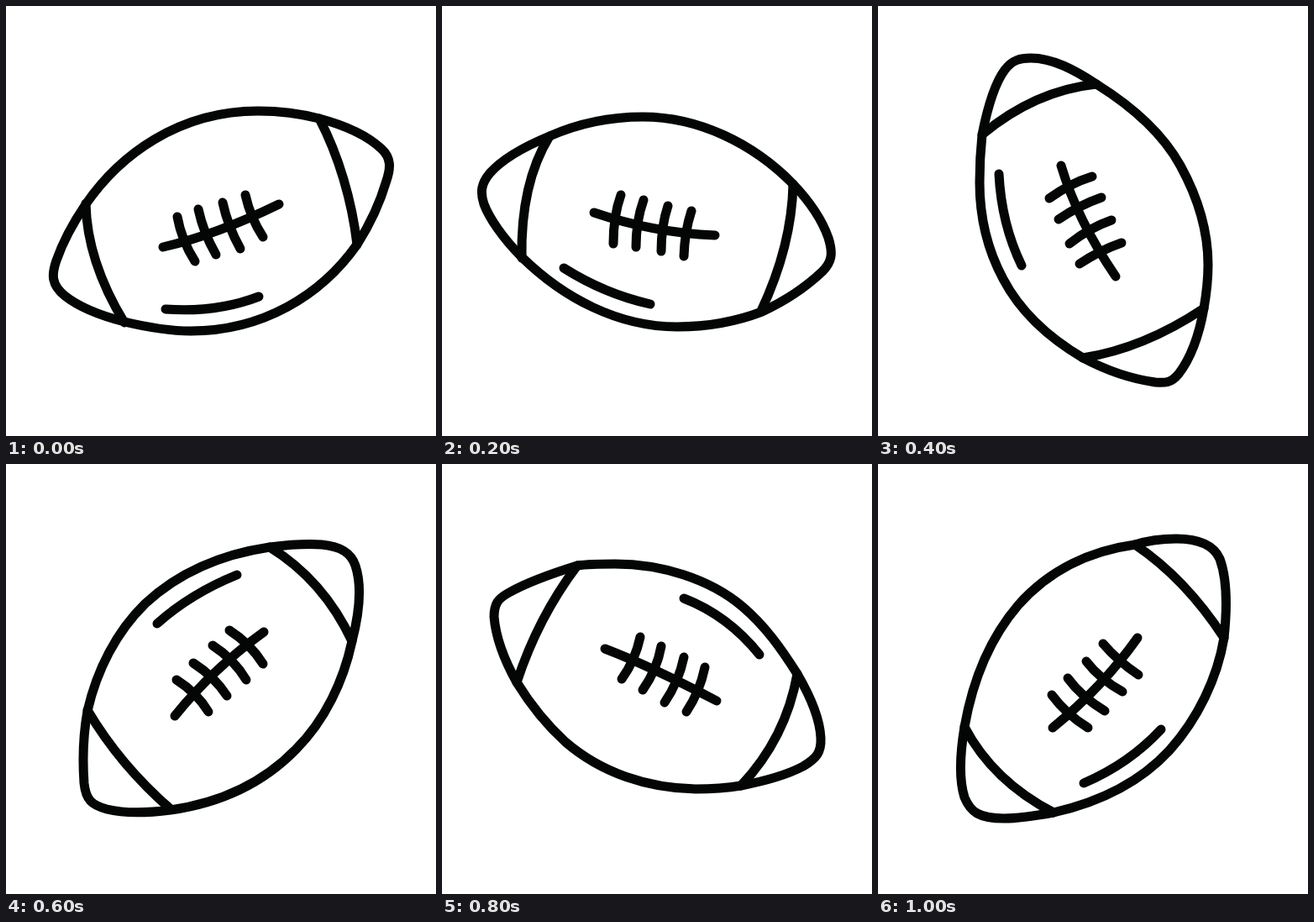
These frames come from a looping animation (512 by 512 pixels, 1200 ms). An HTML page:

```html
<!DOCTYPE html>
<html lang="en">
<head>
<meta charset="utf-8">
<title>Tumbling ball</title>
<style>
  html, body { margin: 0; width: 100%; height: 100%; overflow: hidden; background: #fff; }
  svg { display: block; width: 100vw; height: 100vh; }
  path { fill: none; stroke: #040505; stroke-width: 11; stroke-linecap: round; stroke-linejoin: round; }
  /* The poses stand side by side; the strip jumps one stage width per step. */
  #strip { animation: tumble 1200ms steps(6, end) infinite; }
  @keyframes tumble { to { transform: translateX(-3072px); } }
</style>
</head>
<body>
<svg viewBox="0 0 512 512">
  <g id="strip">
    <g>
      <path d="M95 236C135 178 205 125 300 125C325 125 350 128 373 134C407 143 432 156 447 170C459 181 458 193 453 208C446 232 434 259 418 284C375 345 305 387 220 387C192 387 166 382 141 376C110 368 85 357 70 345C54 332 54 320 60 303C67 283 80 258 95 236Z"/>
      <path class="bands" d="M95 235C96 285 113 331 141 377M373 134C396 178 412 232 418 284"/>
      <path class="seam" d="M187 287C235 276 280 258 325 236"/>
      <path class="laces" d="M204 251Q209 279 225 304M229 242Q235 270 250 296M258 234Q264 262 279 289M285 225Q291 252 306 275"/>
      <path class="shine" d="M190 361C232 364 270 358 301 346"/>
    </g>
    <g transform="translate(512)">
      <path d="M128 155C162 140 200 132 239 132C305 132 370 163 418 212C438 233 453 256 460 276C466 295 464 305 453 316C433 335 409 351 381 364C347 377 315 382 280 382C210 382 145 348 95 299C72 276 56 252 50 236C45 221 47 211 57 199C73 181 99 167 128 155Z"/>
      <path class="bands" d="M128 155C104 194 94 245 95 300M418 212C417 262 404 312 380 363"/>
      <path class="seam" d="M181 246C225 261 275 271 325 273"/>
      <path class="laces" d="M213 225Q204 250 204 283M240 231Q231 256 231 287M269 238Q261 262 261 292M297 244Q289 268 288 298"/>
      <path class="shine" d="M145 312C175 331 208 346 248 355"/>
    </g>
    <g transform="translate(1024)">
      <path d="M124 153C131 118 139 92 151 76C160 64 170 62 182 62C208 62 234 76 260 93C300 118 338 150 360 190C382 230 393 268 393 308C393 325 391 343 388 360C382 394 371 421 358 438C349 449 342 449 330 448C302 444 272 434 244 419C205 396 170 365 149 325C127 284 121 246 121 210C121 190 122 172 124 153Z"/>
      <path class="bands" d="M124 153C165 119 212 98 260 93M244 419C295 411 343 390 388 360"/>
      <path class="seam" d="M218 190C232 237 255 281 283 322"/>
      <path class="laces" d="M204 229Q229 211 255 203M215 254Q240 237 266 228M228 283Q252 264 278 255M240 307Q264 291 290 282"/>
      <path class="shine" d="M144 200C146 240 155 276 171 309"/>
    </g>
    <g transform="translate(1536)">
      <path d="M97 294C108 246 131 200 166 166C207 128 260 107 314 99C338 96 360 95 376 96C399 98 411 106 416 121C424 145 420 180 412 211C402 258 380 305 345 340C303 383 252 404 196 412C165 416 140 416 120 411C102 406 95 400 93 380C91 352 92 322 97 294Z"/>
      <path class="bands" d="M314 99C358 126 391 166 412 211M97 293C123 337 157 377 196 411"/>
      <path class="seam" d="M201 300C230 264 264 231 307 200"/>
      <path class="laces" d="M203 257Q227 272 241 295M223 237Q248 253 263 276M246 216Q271 232 286 257M266 198Q291 214 306 238"/>
      <path class="shine" d="M180 190C208 165 238 147 275 132"/>
    </g>
    <g transform="translate(2048)">
      <path d="M161 121C175 119 190 119 206 119C260 119 318 136 358 170C385 193 404 220 423 250C440 279 450 306 451 326C452 344 445 351 430 360C409 371 382 378 356 383C338 386 320 387 302 387C245 386 190 368 147 331C124 310 105 286 89 260C75 235 64 206 62 182C62 166 67 160 80 153C103 140 132 130 161 121Z"/>
      <path class="bands" d="M161 121C130 162 106 208 89 260M423 250C414 301 391 346 356 383"/>
      <path class="seam" d="M194 220C236 236 283 259 327 282"/>
      <path class="laces" d="M236 206Q230 234 214 256M261 217Q256 245 239 269M288 230Q282 259 265 284M313 242Q307 271 291 295"/>
      <path class="shine" d="M288 160C324 174 354 197 378 227"/>
    </g>
    <g transform="translate(2560)">
      <path d="M103 313C112 262 131 210 167 168C205 125 255 103 306 96C325 90 340 89 355 89C382 89 400 97 407 113C415 135 416 170 412 207C404 255 381 303 347 341C310 381 262 403 209 415C187 419 168 422 150 422C120 422 110 414 103 397C96 375 98 343 103 313Z"/>
      <path class="bands" d="M306 96C349 125 384 164 412 207M103 313C125 355 161 390 209 415"/>
      <path class="seam" d="M208 314C246 283 280 248 309 207"/>
      <path class="laces" d="M207 275Q224 298 250 314M226 255Q242 277 270 294M248 235Q264 256 291 271M268 214Q286 235 310 251"/>
      <path class="shine" d="M245 380C280 365 311 344 337 316"/>
    </g>
  </g>
</svg>
</body>
</html>
```
